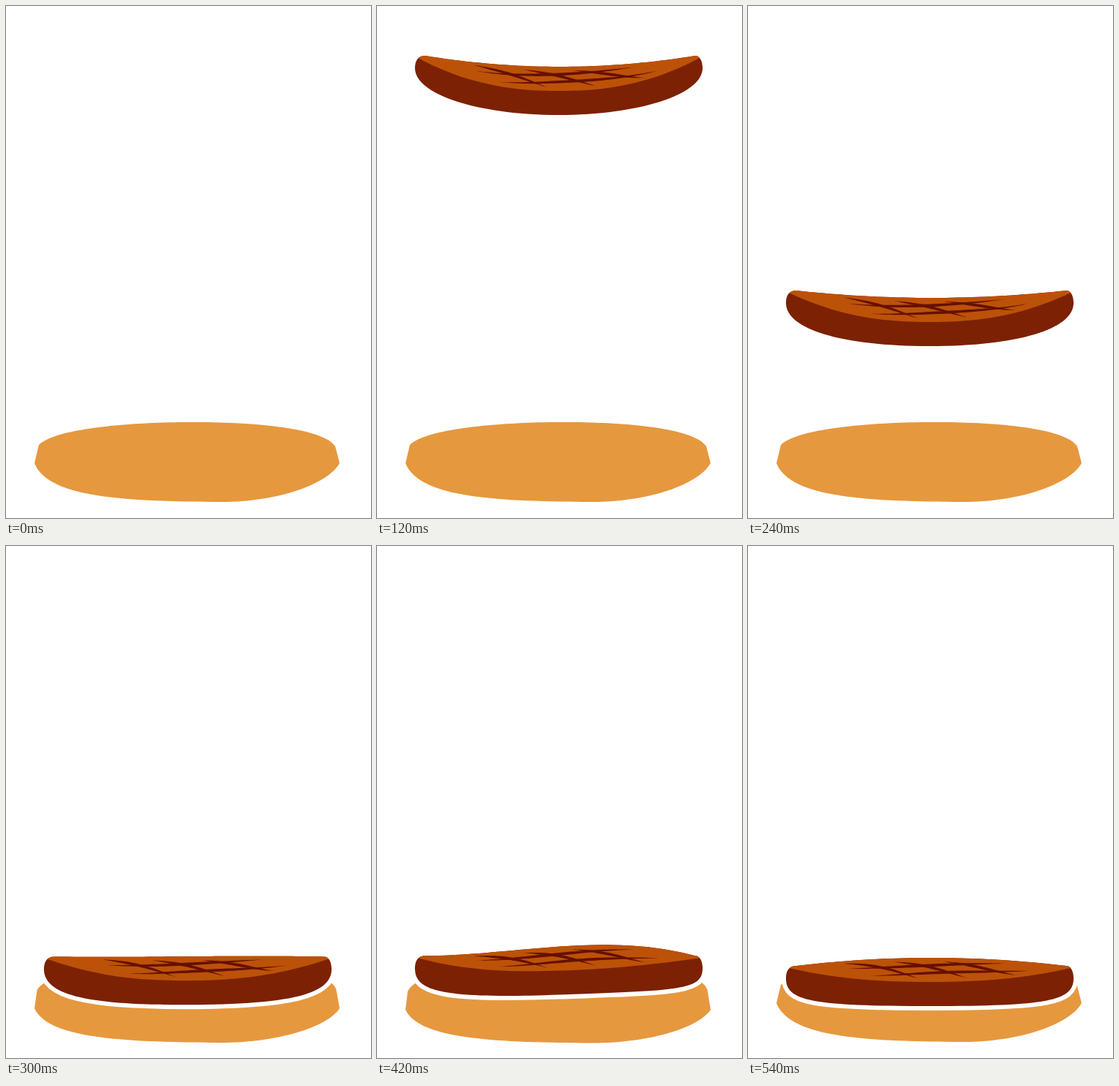
Recreate the animation shown at these times as an HTML page with a canvas. Size 500x700 px, loop 900 ms.

```html
<!DOCTYPE html>
<html>
<head>
<meta charset="utf-8">
<style>
html, body { margin: 0; overflow: hidden; background: #fff }
canvas { display: block }
</style>
</head>
<body>
<canvas id="stage" width="500" height="700"></canvas>
<script>
const ctx = document.getElementById('stage').getContext('2d');
const LOOP = 900, STEP = 30, DROP = 120, LAND = 270, REST = 540;
const LEFT = 52, RIGHT = 446, MID = 249, HALF = 33; // patty tips, centre, half thickness

const lerp = (a, b, u) => a + (b - a) * u;

// How far the tips sit below the middle of the top edge
const liftKeys = [[0, 2], [DROP, 2], [180, -1.5], [240, 7], [360, 27.5], [480, 32], [REST, 28], [LOOP, 28]];

function liftAt(t) {
  const n = liftKeys.findIndex(k => t < k[0]);
  const [a, from] = liftKeys[n - 1], [b, to] = liftKeys[n];
  return lerp(from, to, (t - a) / (b - a));
}

function poseAt(t) {
  const fall = Math.max(0, t - DROP) / 60;
  const p = Math.min(1, Math.max(0, t - LAND) / (REST - LAND));
  const hop = Math.sin(Math.PI * p ** 1.5);
  const top = Math.min(563, 83 + 79 * fall ** 2) - 16 * hop;
  return {
    top,
    tip: top + liftAt(t),
    lean: 17 * hop,
    squash: 6.75 * p * (1 - p) ** 2
  };
}

// Height at x of a bow with ends at endY and its middle at midY
function bow(x, x0, x1, endY, midY, power, lean) {
  const u = (x - x0) / (x1 - x0);
  return lerp(midY, endY, Math.abs(2 * u - 1) ** power) + 3 * lean * u * (1 - u) * (1 - 2 * u);
}
const topY = (x, p) => bow(x, 66, 436, p.tip - 17, p.top, 2, p.lean);
const crustY = (x, p) => bow(x, 56, 442, p.tip - 14, p.top + HALF, 2.3, p.lean / 2);

function lineAlong(x0, x1, yOf) {
  for (let i = 0; i <= 40; i++) {
    const x = lerp(x0, x1, i / 40);
    ctx.lineTo(x, yOf(x));
  }
}

function drawBun(s) {
  const side = 625 + 12 * s, low = 678 + 2 * s;
  ctx.beginPath();
  ctx.moveTo(45 - 4 * s, 600 + 12 * s);
  ctx.bezierCurveTo(70 - 15 * s, 576, 180, 569, 250, 569);
  ctx.bezierCurveTo(330, 568, 435 + 10 * s, 576, 451 + 2 * s, 602 + 6 * s);
  ctx.lineTo(457, side);
  ctx.bezierCurveTo(440, 655 + 6 * s, 370, low, 295, low);
  ctx.bezierCurveTo(170, low - 1, 58, low - 4, 39, side);
  ctx.fillStyle = '#e6983e';
  ctx.fill();
}

function traceBody(p) {
  const { tip, top, lean } = p;
  const base = top + 2 * HALF, depth = base - tip;
  const full = 1.2 - depth / 100; // flatter bodies have squarer corners
  const reach = full * (MID - LEFT), tilt = reach * lean / 450;
  ctx.beginPath();
  ctx.moveTo(LEFT, tip);
  ctx.bezierCurveTo(LEFT, tip - 10, 56, tip - 17, 66, topY(66, p));
  lineAlong(66, 436, x => topY(x, p));
  ctx.bezierCurveTo(442, tip - 17, RIGHT, tip - 10, RIGHT, tip);
  ctx.bezierCurveTo(RIGHT, tip + full * depth, MID + reach, base - tilt, MID, base);
  ctx.bezierCurveTo(MID - reach, base + tilt, LEFT, tip + full * depth, LEFT, tip);
  ctx.closePath();
}

// A tapered grill mark; v is the depth from top edge (0) to crust (1)
function drawMark(p, x0, v0, x1, v1, bend) {
  const side = d => x => {
    const s = (x - x0) / (x1 - x0), swell = Math.sin(Math.PI * s);
    return lerp(topY(x, p), crustY(x, p), lerp(v0, v1, s) + bend * swell) + d * swell;
  };
  ctx.beginPath();
  lineAlong(x0, x1, side(-1.9));
  lineAlong(x1, x0, side(1.9));
  ctx.fill();
}

function drawPatty(p) {
  ctx.save();
  traceBody(p);
  ctx.strokeStyle = '#fff';
  ctx.lineWidth = 12;
  ctx.stroke();
  ctx.fillStyle = '#7c2103';
  ctx.fill();

  ctx.clip();
  ctx.beginPath();
  lineAlong(56, 442, x => crustY(x, p));
  ctx.lineTo(442, p.top - 50);
  ctx.lineTo(56, p.top - 50);
  ctx.fillStyle = '#bc5208';
  ctx.fill();

  ctx.fillStyle = '#661000';
  for (let i = 0; i < 3; i++) drawMark(p, 132 + 68 * i, .15, 233 + 67 * i, .86, -.11);
  for (let i = 0; i < 2; i++) drawMark(p, 136 + 31 * i, .46 + .34 * i, 353 + 33 * i, .18 + .46 * i, -.12 * i);
  ctx.restore();
}

function frame(now) {
  const t = Math.floor(now % LOOP / STEP) * STEP, pose = poseAt(t);
  ctx.fillStyle = '#fff';
  ctx.fillRect(0, 0, 500, 700);
  drawBun(pose.squash);
  drawPatty(pose);
  // The patty fades in before it drops
  ctx.fillStyle = `rgba(255, 255, 255, ${Math.max(0, 1 - t / DROP)})`;
  ctx.fillRect(0, 0, 500, 200);
  requestAnimationFrame(frame);
}
requestAnimationFrame(frame);
</script>
</body>
</html>
```
